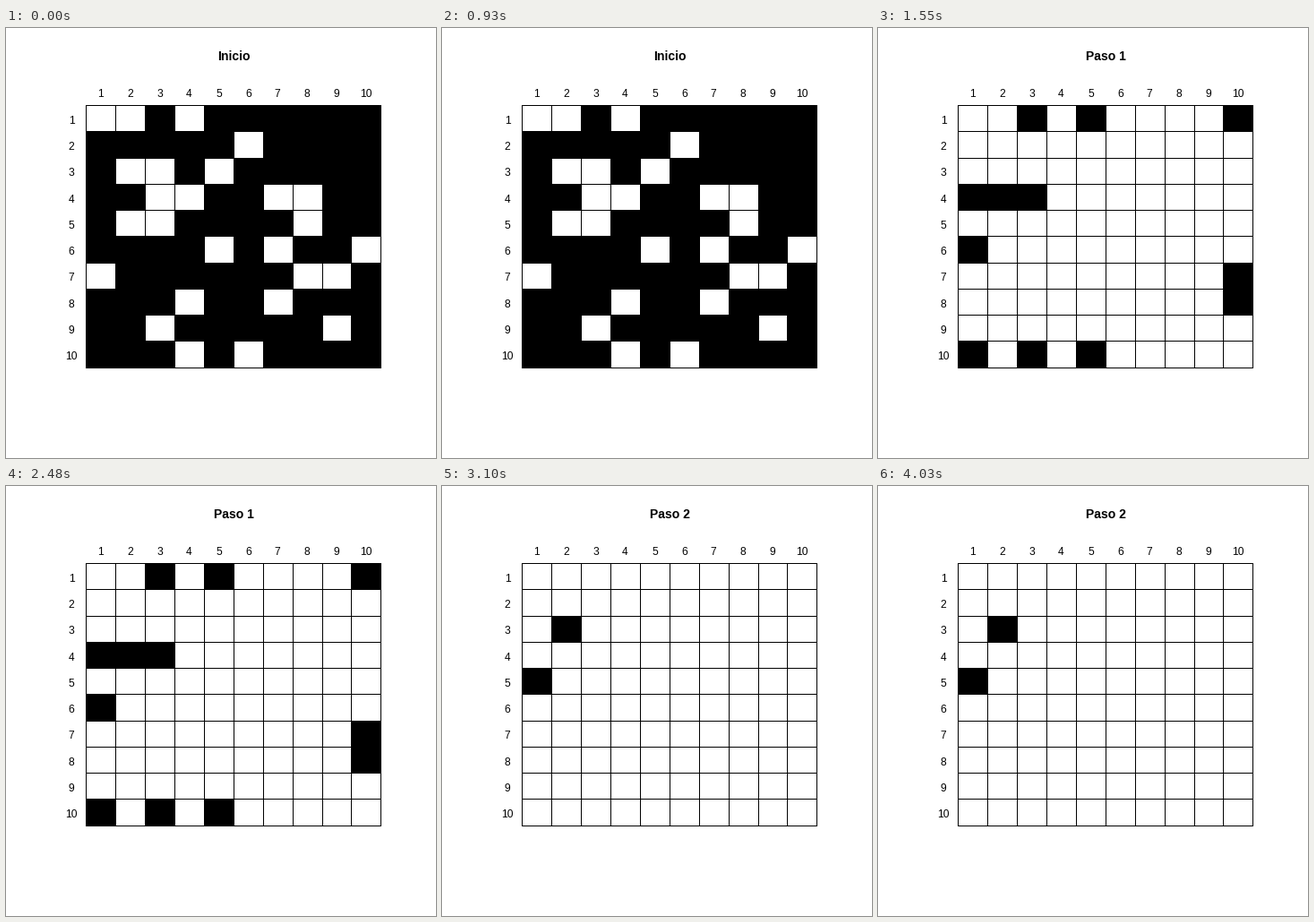
Animation, 480 px wide and 480 px high, one loop 4650 ms. Source, as a matplotlib script:

```python
import numpy as np
import matplotlib.pyplot as plt
from matplotlib.animation import FuncAnimation
from matplotlib.patches import Rectangle

SIZE, N = 480, 10
START = [
    "..#.######",
    "#####.####",
    "#..#.#####",
    "##..##..##",
    "#..####.##",
    "####.#.##.",
    ".######..#",
    "###.##.###",
    "##.#####.#",
    "###.#.####",
]
TITLES = ["Inicio", "Paso 1", "Paso 2"]
X0, DX = 89.35, 32.9
Y0, DY = 86, 29.25


def evolve(cells):
    """A cell is alive next if exactly three neighbours are alive."""
    p = np.pad(cells.astype(int), 1)
    total = sum(p[r:r + N, c:c + N] for r in range(3) for c in range(3))
    return total - cells == 3


states = [np.array([[ch == "#" for ch in row] for row in START])]
while len(states) < len(TITLES):
    states.append(evolve(states[-1]))

xs = [int(X0 + DX * i + 0.5) for i in range(N + 1)]
ys = [int(Y0 + DY * i + 0.5) for i in range(N + 1)]

plt.rcParams["font.family"] = "Liberation Sans"
fig = plt.figure(figsize=(SIZE / 72, SIZE / 72), dpi=72, facecolor="white")
ax = fig.add_axes([0, 0, 1, 1])
ax.set_xlim(0, SIZE)
ax.set_ylim(SIZE, 0)
ax.axis("off")


def box(x0, y0, x1, y1):
    return ax.add_patch(Rectangle((x0, y0), x1 - x0, y1 - y0, facecolor="black",
                                  edgecolor="none", linewidth=0, antialiased=False))


def label(x, y, text, size=12, weight="normal"):
    return ax.text(x, y, text, fontsize=size, weight=weight,
                   ha="center", va="baseline", color="black")


for x in xs:
    box(x, ys[0], x + 1, ys[-1] + 1)
for y in ys:
    box(xs[0], y, xs[-1] + 1, y + 1)
for i in range(N):
    label(X0 + DX * (i + 0.5), 77, str(i + 1))
    label(73, round(Y0 + DY * (i + 0.5) + 6.3), str(i + 1))

squares = [[box(xs[c], ys[r], xs[c + 1] + 1, ys[r + 1] + 1) for c in range(N)]
           for r in range(N)]
title = label(254, 36, "", 14, "bold")


def update(step):
    title.set_text(TITLES[step])
    for r in range(N):
        for c in range(N):
            squares[r][c].set_visible(bool(states[step][r, c]))
    return [title]


anim = FuncAnimation(fig, update, frames=len(TITLES), interval=1550,
                     init_func=lambda: update(0), repeat=True, repeat_delay=0)
plt.show()
```
